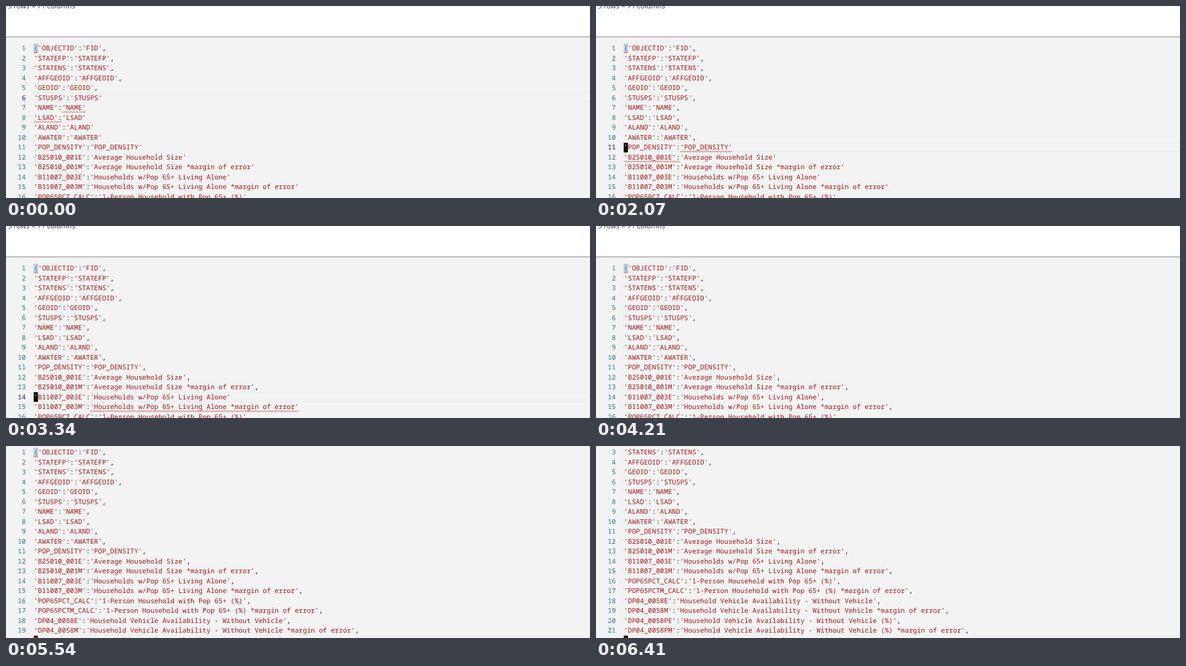
Recreate the animation shown at these times as an HTML page with a canvas. Size 970 by 320 pixels, loop 6.61 s.

```html
<!DOCTYPE html>
<html lang="en">
<head>
<meta charset="utf-8">
<title>Editing a dictionary</title>
<style>
  html, body { margin: 0; width: 100%; height: 100%; overflow: hidden; background: #fff; }
  canvas { display: block; }
</style>
</head>
<body>
<canvas id="stage" width="970" height="320"></canvas>
<script>
const ctx = document.getElementById('stage').getContext('2d');
ctx.textRendering = 'geometricPrecision';

const LOOP = 6610, WIDTH = 970, HEIGHT = 320;
const LEFT = 46.3, CELL = 6.667, ROW = 16.5, FIRST_ROW = 62.5;
const CODE_FONT = '11.11px "Noto Sans Mono", monospace';

const vehicle = 'Household Vehicle Availability - Without Vehicle';
const living = 'Households w/Pop 65+ Living Alone';
const person = '1-Person Household with Pop 65+ (%)';
const size = 'Average Household Size';
const margin = ' *margin of error';
const same = name => [name, name];

const entries = [
  ['OBJECTID', 'FID'],
  ...['STATEFP', 'STATENS', 'AFFGEOID', 'GEOID', 'STUSPS', 'NAME',
      'LSAD', 'ALAND', 'AWATER', 'POP_DENSITY'].map(same),
  ['B25010_001E', size],
  ['B25010_001M', size + margin],
  ['B11007_003E', living],
  ['B11007_003M', living + margin],
  ['POP65PCT_CALC', person],
  ['POP65PCTM_CALC', person + margin],
  ['DP04_0058E', vehicle],
  ['DP04_0058M', vehicle + margin],
  ['DP04_0058PE', vehicle + ' (%)'],
  ['DP04_0058PM', vehicle + ' (%)' + margin],
  ['B25070_010E', 'Households Paying Half of Income Toward Rent']
].map(pair => pair.map(text => `'${text}'`));

// Moments at which a comma is added, and at which the error marks move down.
const commaTimes = [600, 1000, 1340, 1670, 2000, 2400, 2740, 3080, 3470, 3880,
                    4210, 4740, 5140, 5540, 5940, 6410];
const errorTimes = [860, 1270, 1600, 1930, 2330, 2670, 3010, 3340, 3730,
                    4210, 4740, 5140, 5540, 5940, 6410];
const passed = (times, t) => times.filter(time => time <= t).length;
const scrollAt = t => t < 4740 ? 0 : t < 5540 ? 27 : t < 6410 ? 60 : 93;
const columnX = column => LEFT + column * CELL;

function write(text, column, baseline, color) {
  ctx.fillStyle = color;
  [...text].forEach((char, i) => ctx.fillText(char, columnX(column + i), baseline));
}

function squiggle(column, length, top) {
  const x = columnX(column), y = top + 14;
  ctx.save();
  ctx.beginPath();
  ctx.rect(x, y - 1, length * CELL, 4);
  ctx.clip();
  ctx.beginPath();
  for (let i = 0; i <= length * CELL / 2.5 + 1; i++) ctx.lineTo(x + i * 2.5, y + (i % 2 ? 2.1 : 0.3));
  ctx.strokeStyle = '#d63a2c';
  ctx.lineWidth = 0.9;
  ctx.stroke();
  ctx.restore();
}

function drawCursorLine(top) {
  ctx.fillStyle = '#ebebeb';
  ctx.fillRect(46, Math.round(top), WIDTH, 1);
  ctx.fillRect(46, Math.round(top + ROW) - 2, WIDTH, 1);
}

function drawBracket(top, baseline) {
  const y = Math.round(top);
  ctx.fillStyle = '#b3bcc4';
  ctx.fillRect(46, y, 7, 15);
  ctx.fillStyle = '#c8d8e6';
  ctx.fillRect(47, y + 1, 5, 13);
  write('{', 0, baseline, '#2f6fb0');
  squiggle(0, 1, top);
}

function drawLine(number, top, state) {
  const [key, value] = entries[number - 1];
  const baseline = Math.round(top + 11.5);
  const start = number === 1 ? 1 : 0;
  const valueColumn = start + key.length + 1;
  const active = number === state.cursor;

  if (active) drawCursorLine(top);
  const label = String(number);
  ctx.fillStyle = active ? '#0b216f' : '#237893';
  [...label].forEach((digit, i) => ctx.fillText(digit, 32.8 - (label.length - i) * CELL, baseline));

  if (start) drawBracket(top, baseline);
  write(key, start, baseline, '#a31515');
  write(':', valueColumn - 1, baseline, '#000');
  write(value, valueColumn, baseline, '#a31515');
  if (number < state.cursor) write(',', valueColumn + value.length, baseline, '#000');

  if (number === state.error) squiggle(valueColumn, value.length, top);
  if (number === state.error + 1) squiggle(0, key.length + 1, top);

  if (active && state.cursorColor) {
    ctx.fillStyle = state.cursorColor;
    ctx.fillRect(46, Math.round(top), 7, 16);
    write("'", 0, baseline, '#fff');
  }
}

function draw(t) {
  const scroll = scrollAt(t);
  const state = {
    cursor: 6 + passed(commaTimes, t),
    error: 7 + passed(errorTimes, t),
    cursorColor: t < 270 ? null : t < 4740 ? '#000' : t < 6410 ? '#6b1a1a' : '#33090c'
  };

  ctx.fillStyle = '#fff';
  ctx.fillRect(0, 0, WIDTH, HEIGHT);
  ctx.font = '11.75px "Open Sans", sans-serif';
  ctx.fillStyle = '#3b3b4f';
  ctx.fillText('5 rows × 71 columns', 3, 4 - scroll);

  const edge = 51 - scroll;
  ctx.fillStyle = '#f3f3f3';
  ctx.fillRect(0, edge, WIDTH, HEIGHT - edge);
  ctx.fillStyle = scroll ? '#3f8edc' : '#7f7f7f';
  ctx.fillRect(0, edge, WIDTH, 1);

  ctx.font = CODE_FONT;
  entries.forEach((_, i) => {
    const top = FIRST_ROW + i * ROW - scroll;
    if (top > -ROW && top < HEIGHT) drawLine(i + 1, top, state);
  });
}

const started = performance.now();
function tick() {
  draw((performance.now() - started) % LOOP);
  requestAnimationFrame(tick);
}
tick();
</script>
</body>
</html>
```
